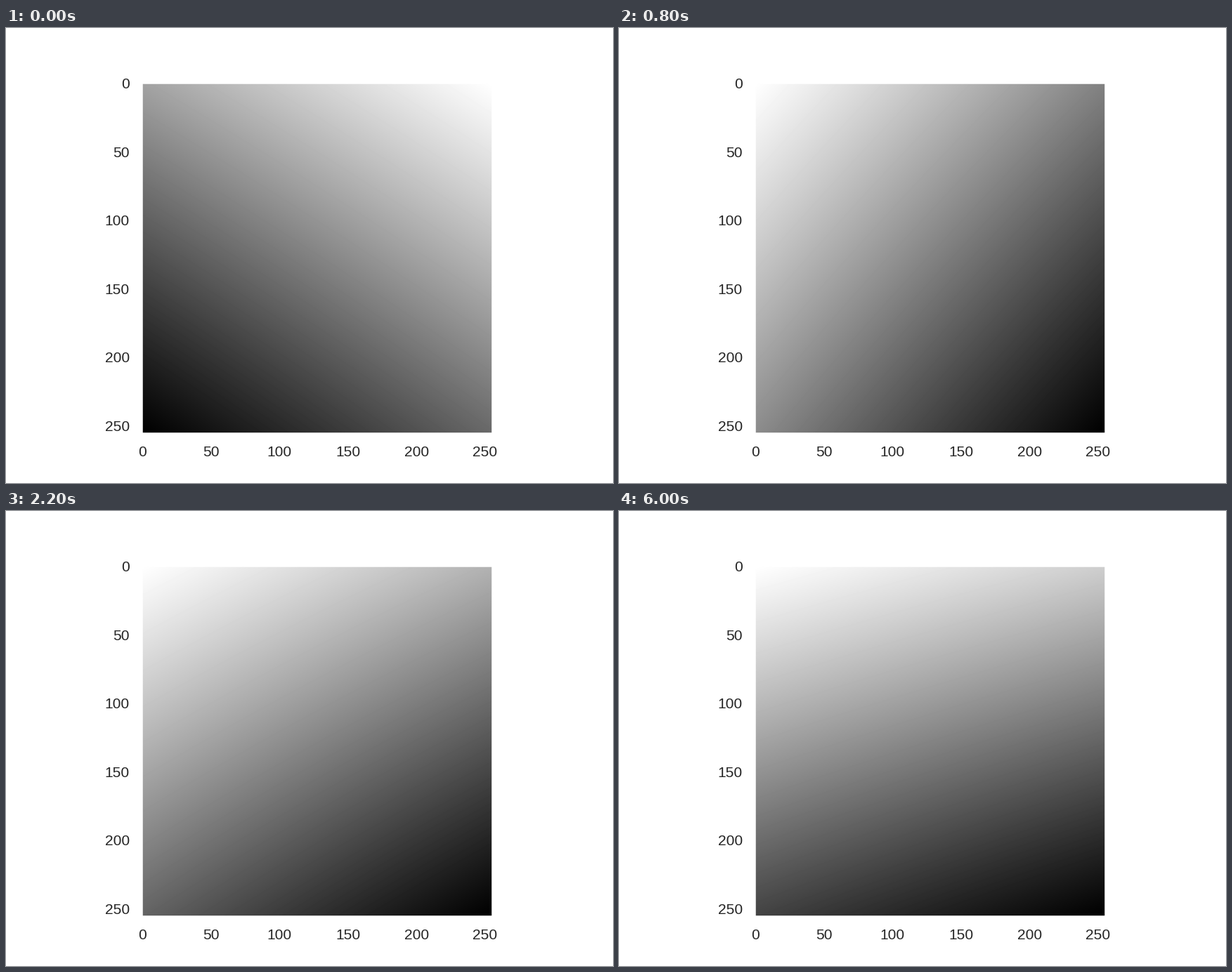
A matplotlib script for the animation above (8 s loop, 864 by 648 pixels).

```python
import numpy as np
import matplotlib.pyplot as plt
from matplotlib.animation import FuncAnimation

plt.rcParams["font.family"] = "Liberation Sans"

SIZE = 256
STEP_MS = 200
FRAMES = 40
INK = "#262626"

# Grey levels of the two drifting corners after the initial jump.
TIMES = [200, 400, 600, 800, 1200, 1600, 2200, 3000, 4200, 6000, 8000]
TOP_RIGHT = [80, 101, 118, 129, 147, 160, 175, 186, 196, 203, 207]
BOTTOM_LEFT = [176, 160, 148, 139, 125, 114, 101, 89, 77, 70, 66]

x, y = np.meshgrid(np.linspace(0, 1, SIZE), np.linspace(0, 1, SIZE))


def corners(ms):
    """Top left, top right, bottom left and bottom right grey levels."""
    if ms < TIMES[0]:
        return 160, 255, 0, 106
    return 255, np.interp(ms, TIMES, TOP_RIGHT), np.interp(ms, TIMES, BOTTOM_LEFT), 0


def surface(ms):
    tl, tr, bl, br = corners(ms)
    top = tl + (tr - tl) * x
    bottom = bl + (br - bl) * x
    v = (top + (bottom - top) * y) / 255
    soft = v * v * (3 - 2 * v)
    return 0.88 * v + 0.12 * soft


fig, ax = plt.subplots(figsize=(6, 4.5), dpi=144, facecolor="white")
image = ax.imshow(surface(0), cmap="gray", vmin=0, vmax=1)
ax.set_xticks(range(0, SIZE, 50))
ax.set_yticks(range(0, SIZE, 50))
ax.tick_params(length=0, labelsize=10.5, labelcolor=INK)
ax.tick_params(axis="x", pad=9.2)
ax.tick_params(axis="y", pad=8.8)
for spine in ax.spines.values():
    spine.set(color="white", linewidth=1.25)


def update(frame):
    image.set_data(surface(frame * STEP_MS))
    return [image]


anim = FuncAnimation(fig, update, frames=FRAMES, interval=STEP_MS,
                     repeat=True, repeat_delay=0, blit=False)
plt.show()
```
